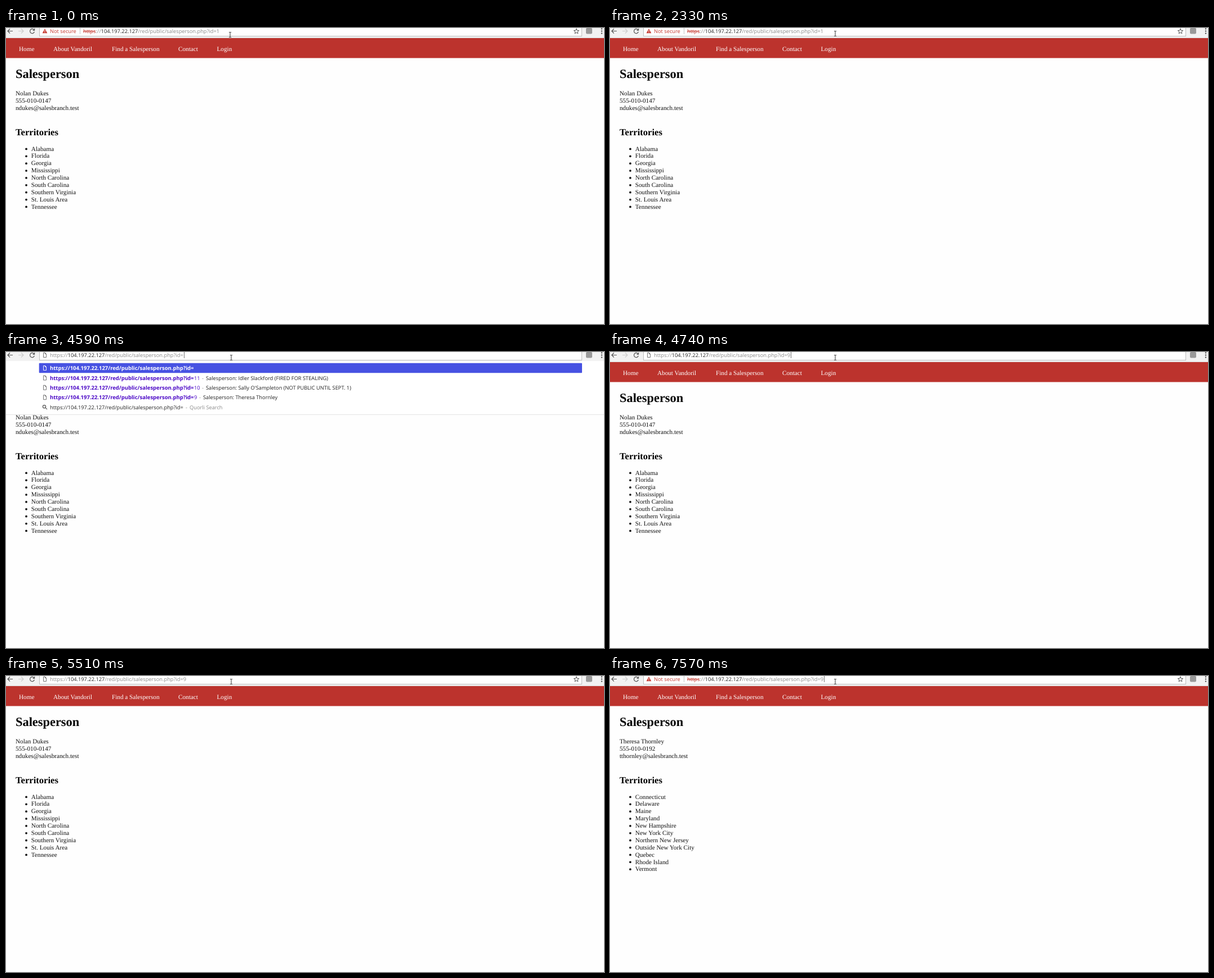
Recreate the animation shown at these times as an HTML page. Size 1062 by 527 pixels, loop 8 s.

```html
<!DOCTYPE html>
<html lang="en">
<head>
<meta charset="utf-8">
<title>Salesperson</title>
<style>
  html, body { margin: 0; width: 100%; height: 100%; overflow: hidden; background: #fefefe; }
  svg { display: block; width: 1062px; height: 527px; }
  text { text-rendering: geometricPrecision; white-space: pre; }
  .page { font: 11.2px "Liberation Serif", "Times New Roman", serif; fill: #111; }
  .page .h1 { font-size: 22.4px; font-weight: bold; fill: #000; }
  .page .h2 { font-size: 16.6px; font-weight: bold; fill: #000; }
  .ui { font: 9.27px "Open Sans", "Noto Sans", sans-serif; fill: #222; }
  .ui .b { font-size: 9.48px; font-weight: bold; }
  .ui .link { fill: #4b08c6; }
  .ui .dim { fill: #8a8a8a; }
  .ui .red { fill: #c5392f; }
  .ui .on, .ui .on tspan { fill: #fff; }
  .line { fill: none; stroke: #555; stroke-width: 1.2; }
</style>
</head>
<body>
<svg id="stage" viewBox="0 0 1062 527" xmlns="http://www.w3.org/2000/svg"></svg>
<script>
const LOOP = 8000;
const HOST = "104.197.22.127", PATH = "/red/public/salesperson.php?id=";
const BASE = "https://" + HOST + PATH;
const stage = document.getElementById("stage");

const people = [
  { name: "Nolan Dukes", phone: "555-010-0147", mail: "ndukes@salesbranch.test",
    areas: ["Alabama", "Florida", "Georgia", "Mississippi", "North Carolina", "South Carolina",
      "Southern Virginia", "St. Louis Area", "Tennessee"] },
  { name: "Theresa Thornley", phone: "555-010-0192", mail: "tthornley@salesbranch.test",
    areas: ["Connecticut", "Delaware", "Maine", "Maryland", "New Hampshire", "New York City",
      "Northern New Jersey", "Outside New York City", "Quebec", "Rhode Island", "Vermont"] }
];

const text = (x, y, s, cls = "") => `<text x="${x}" y="${y}" class="${cls}">${s}</text>`;
const rect = (x, y, w, h, fill, more = "") =>
  `<rect x="${x}" y="${y}" width="${w}" height="${h}" fill="${fill}" ${more}/>`;
const group = (id, body, cls = "") => `<g id="${id}" class="${cls}">${body}</g>`;
const sheet = (y, color) =>
  `<path class="line" d="M66.5 ${y - 4}h3l2 2v6h-5zM69.5 ${y - 4}v2h2" style="stroke:${color};stroke-width:.9"/>`;
const lens = y =>
  `<g class="line"><circle cx="68" cy="${y - 1}" r="2.6"/><path d="M70 ${y + 1}l3 3"/></g>`;

function person(p, i) {
  const lines = [p.name, p.phone, p.mail].map((s, k) => text(17, 120 + 12.9 * k, s));
  const items = p.areas.map((s, k) => {
    const y = 218.6 + 12.88 * k;
    return `<circle cx="36" cy="${y - 3.2}" r="1.9"/>` + text(44.8, y, s);
  });
  return group("person" + i, lines.concat(items).join(""));
}

function navBar() {
  const items = [[23, "Home"], [84, "About Vandoril"], [188, "Find a Salesperson"],
    [306, "Contact"], [374.5, "Login"]];
  return rect(0, 18, 1062, 35.5, "#bc332d") +
    `<g fill="#fff">${items.map(([x, s]) => text(x, 40.5, s)).join("")}</g>`;
}

// One visited address in the suggestion list
const visit = (y, id, dash, x, title) => sheet(y - 3.5, "#666") +
  text(78, y, BASE, "b link") + text(334, y, id, "link") +
  text(dash, y, "-", "dim") + text(x, y, "Salesperson: " + title);

const lookup = (y, id, dash) => lens(y - 3.5) + text(78, y, BASE + id) +
  text(dash, y, "-", "dim") + text(dash + 7, y, "Quorli Search", "dim");

const panel = bottom => rect(0, 16, 1062, bottom - 16, "#fff") +
  rect(0, bottom, 1062, 1, "#e4e4e4") +
  rect(58.7, 19.7, 964.3, 17.5, "#4752e2", 'rx="1"') + sheet(28.5, "#fff");

const longList = panel(111) + text(78, 32, BASE, "b on") +
  visit(49.5, "11", 348, 355, "Idler Slackford (FIRED FOR STEALING)") +
  visit(66.8, "10", 348, 355, "Sally O'Sampleton (NOT PUBLIC UNTIL SEPT. 1)") +
  visit(84.2, "9", 343, 350, people[1].name) + lookup(101.7, "", 319);

const shortList = panel(59) + text(78, 32, BASE + "9", "b on") + text(343.5, 32, "-", "on") +
  text(350, 32, "Salesperson: " + people[1].name, "on") + lookup(49.5, "9", 324);

function star() {
  let d = "";
  for (let i = 0; i < 10; i++) {
    const r = i % 2 ? 2.1 : 4.9, a = Math.PI * (i / 5 - 0.5);
    d += (i ? "L" : "M") + (1013 + r * Math.cos(a)).toFixed(2) + " " + (6 + r * Math.sin(a)).toFixed(2);
  }
  return `<path id="star" class="line" d="${d}Z" style="stroke-width:1"/>`;
}

const toolbar = rect(0, 0, 1062, 17, "#f2f2f2") + rect(0, 17, 1062, 1, "#dedede") +
  rect(59.5, -5, 963, 19.5, "#fff", 'stroke="#bdbdbd"') +
  `<path class="line" d="M12 5.5H3M7 1.5l-4 4 4 4"/>
   <path class="line" d="M22 5.5h9M27 1.5l4 4-4 4" style="stroke:#ccc"/>
   <path class="line" d="M50 3.5A4 4 0 1 0 50.4 6.8"/><path d="M51.2 .6v4.2H47z" fill="#555"/>` +
  star() + rect(1030, 0, 11, 10.5, "#999", 'rx="2"') +
  [1.5, 5.5, 9.5].map(y => `<circle cx="1058" cy="${y}" r="1.2" fill="#555"/>`).join("");

const chip = `<path d="M69 1.3L73.4 9.3H64.6Z" fill="#c5392f"/>` +
  rect(68.5, 4, 1, 2.8, "#fff") + rect(68.5, 7.5, 1, 1, "#fff") +
  text(78, 9, "Not secure", "red") + rect(131, 0, 1, 11, "#c4c4c4");

const address = `<text id="url" y="9"><tspan id="scheme">https</tspan><tspan class="dim">://</tspan>` +
  `<tspan>${HOST}</tspan><tspan class="dim">${PATH}</tspan><tspan id="number" class="dim"></tspan></text>`;

stage.innerHTML =
  group("page", text(17, 89.3, "Salesperson", "h1") + text(17, 190.6, "Territories", "h2") +
    people.map(person).join("") + navBar(), "page") +
  group("bar", toolbar + group("chip", chip) + group("file", sheet(5.5, "#666")) +
    rect(137, 0, 243.5, 11, "#3390ff", 'id="mark"') + address +
    rect(137, 5.6, 21.5, 1, "#c5392f", 'id="strike"') +
    rect(0, 0, 1, 11, "#777", 'id="caret"') +
    group("long", longList) + group("short", shortList), "ui") +
  `<path id="beam" class="line" d="M-2 -4.5h1.5l.5 .5 .5 -.5h1.5M0 -4v8M-2 4.5h1.5l.5 -.5 .5 .5h1.5"
    style="stroke:#333;stroke-width:1"/>`;

// Each step holds only what changes at that time
const steps = [
  [0, { beam: [398, 12], who: 0, id: "1", chip: true, star: true, mark: false, caret: 0, list: "" }],
  [120, { beam: [399, 11] }],
  [250, { beam: [400, 10] }],
  [680, { mark: true }],
  [1800, { mark: false, caret: 380 }],
  [2330, { caret: 0 }],
  [2480, { id: "", chip: false, star: false, caret: 316, list: "long" }],
  [3080, { caret: 0 }],
  [3630, { caret: 316 }],
  [4030, { caret: 0 }],
  [4590, { caret: 316 }],
  [4740, { id: "9", caret: 321, list: "" }],
  [5110, { list: "short" }],
  [5260, { caret: 0 }],
  [5510, { list: "", star: true }],
  [5780, { chip: true }],
  [5900, { who: 1 }],
  [6860, { caret: 380 }],
  [7010, { mark: true, caret: 0 }],
  [7570, { mark: false, caret: 380 }]
];

const $ = id => document.getElementById(id);
const show = (id, on) => $(id).setAttribute("visibility", on ? "visible" : "hidden");

function draw(t) {
  const s = Object.assign({}, ...steps.filter(([at]) => at <= t).map(([, change]) => change));
  people.forEach((p, i) => show("person" + i, i === s.who));
  show("chip", s.chip);
  show("file", !s.chip);
  show("star", s.star);
  show("mark", s.mark);
  show("strike", s.chip);
  show("caret", s.caret > 0);
  show("long", s.list === "long");
  show("short", s.list === "short");
  $("caret").setAttribute("x", s.caret);
  $("url").setAttribute("x", s.chip ? 137 : 78);
  $("url").setAttribute("class", s.mark ? "on" : "");
  $("scheme").setAttribute("class", s.chip ? "red" : "dim");
  $("strike").setAttribute("fill", s.mark ? "#fff" : "#c5392f");
  $("number").textContent = s.id;
  $("beam").setAttribute("transform", `translate(${s.beam})`);
}

const start = performance.now();
function tick() {
  draw((performance.now() - start) % LOOP);
  requestAnimationFrame(tick);
}
tick();
</script>
</body>
</html>
```
